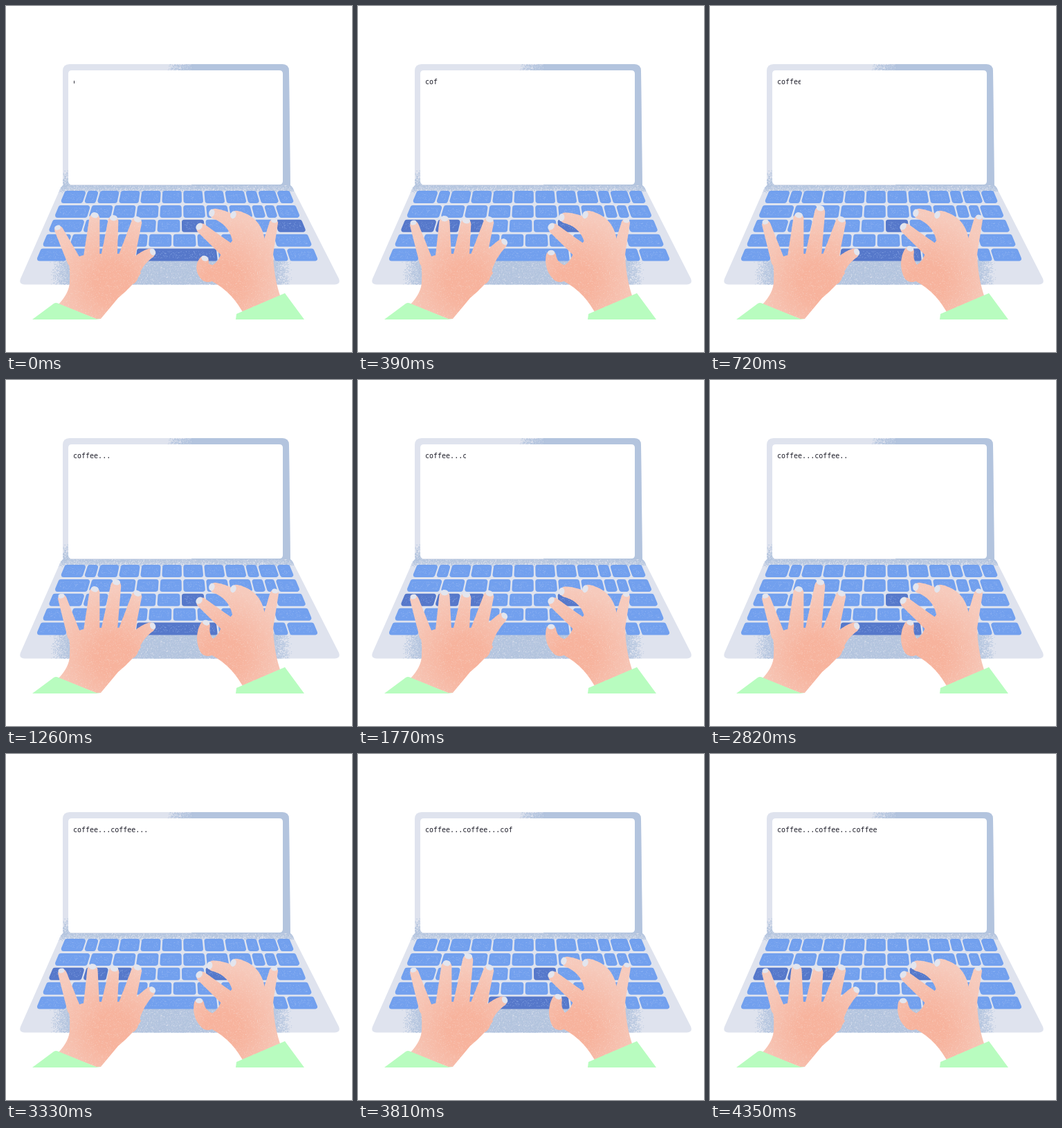
Animation of 500x500 px, one loop 4380 ms. Source, as an HTML page with a canvas:

```html
<!DOCTYPE html>
<html lang="en">
<head>
<meta charset="utf-8">
<style>
html, body { margin: 0; width: 100%; height: 100%; overflow: hidden; background: #fff; }
canvas { position: absolute; left: 0; top: 0; }
#text {
  position: absolute; left: 97px; top: 103px; overflow: hidden; white-space: pre;
  font: 10px/14px "DejaVu Sans Mono", "Noto Sans Mono", monospace; color: #1c1c28;
}
</style>
</head>
<body>
<canvas id="stage" width="500" height="500"></canvas>
<div id="text">coffee...coffee...coffee</div>
<script>
const LOOP = 4380, LIGHT = '#dfe3ee', SHADE = '#b3c4de';
const KEY = '#72a0ee', KEY_DOWN = '#5678ca', NAIL = '#e3e5ee', SLEEVE = '#b8fcbf';
const PALE = '#f6cabc', WARM = '#f7b39d';

let seed, g;
const rnd = () => (seed = (seed * 1664525 + 1013904223) >>> 0) / 4294967296;
const clamp = v => Math.max(0, Math.min(1, v));
const mix = (a, b, t) => a + (b - a) * t;

function fill(path, color) {
  g.fillStyle = color;
  g.fill(path);
}

function within(path, draw) {
  g.save();
  g.clip(path);
  draw();
  g.restore();
}

// Scatter specks over a box; density(x, y) is the chance of each one.
function grain(x, y, w, h, color, density) {
  g.fillStyle = color;
  for (let i = 0; i < w * h * 2.5; i++) {
    const px = x + rnd() * w, py = y + rnd() * h;
    if (rnd() < density(px, py)) g.fillRect(px, py, 0.9, 0.9);
  }
}

function drawLaptop() {
  const lid = new Path2D('M82 94Q82 84 92 84H399Q409 84 409 94L411 264H82Z');
  fill(lid, LIGHT);
  within(lid, () => {
    g.fillStyle = SHADE;
    g.fillRect(268, 84, 160, 180);
    grain(230, 84, 40, 10, SHADE, x => clamp((x - 232) / 36));
    grain(82, 236, 10, 28, SHADE, (x, y) => clamp((y - 236) / 28));
  });
  fill(new Path2D('M90 98Q90 93 95 93H395Q400 93 400 98V253Q400 258 395 258H95Q90 258 90 253Z'), '#fff');

  const base = new Path2D('M83 259H411Q414 261 416 266L481 394Q484 402 475 402.5H27Q18 402 21 394L77 267Q80 260 83 259Z');
  fill(base, LIGHT);
  within(base, () => {
    grain(76, 258, 342, 13, SHADE, (x, y) => clamp((270 - y) / 12));
    // Shadow of the hands, fading out on both sides
    grain(62, 366, 352, 37, SHADE, x => clamp((176 - Math.abs(x - 238)) / 30) ** 1.5);
  });
}

// Key widths of a row: special ones on the left, a run of equal ones, special ones on the right.
const row = (left, run, right) => [...left, ...Array(run).fill(1), ...right];
const ROWS = [
  row([1.1, 0.6], 7, [0.6, 0.9, 0.7]),
  row([1.45], 7, [0.55, 0.5, 0.95]),
  row([1.4], 8, [0.9, 1.2]).filter((w, i) => i !== 8),
  row([1.1, 0.9, 1, 1.3], 4, [1.2, 1.5]),
  row([1.2, 1, 1.65, 3.25], 1, [1.15, 0.6, 1.15])
];

function drawKeys(home, space) {
  const all = new Path2D();
  // The keyboard widens towards the viewer: u runs from -1 to 1 across it.
  const at = (u, y) => 247.5 + u * (163 + (y - 267) * 0.416);
  g.lineJoin = 'round';
  g.lineWidth = 7;
  ROWS.forEach((widths, r) => {
    const top = 270.5 + r * 20.9, bottom = top + 11;
    const total = widths.reduce((a, b) => a + b);
    let u = -1;
    widths.forEach((w, i) => {
      const next = u + 2 * w / total, key = new Path2D();
      key.moveTo(at(u, top) + 4.8, top);
      key.lineTo(at(next, top) - 4.8, top);
      key.lineTo(at(next, bottom) - 4.8, bottom);
      key.lineTo(at(u, bottom) + 4.8, bottom);
      key.closePath();
      const down = r === 2 && home.includes(i) || r === 4 && i === 3 && space;
      g.strokeStyle = down ? KEY_DOWN : KEY;
      fill(key, g.strokeStyle);
      g.stroke(key);
      all.addPath(key);
      u = next;
    });
  });
  within(all, () => grain(44, 267, 408, 102, 'rgba(170,197,246,.45)', () => 0.07));
}

// Tapered finger from base to tip, bowed sideways by bend.
function finger([x0, y0], [x1, y1], bend, r0, r1) {
  const dx = x1 - x0, dy = y1 - y0, len = Math.hypot(dx, dy);
  const cx = (x0 + x1) / 2 + dy / len * bend, cy = (y0 + y1) / 2 - dx / len * bend;
  const path = new Path2D();
  for (let t = 0; t <= 1; t += 0.02) {
    const x = mix(mix(x0, cx, t), mix(cx, x1, t), t);
    const y = mix(mix(y0, cy, t), mix(cy, y1, t), t);
    const r = mix(r0, r1, t);
    path.moveTo(x + r, y);
    path.arc(x, y, r, 0, 7);
  }
  const turn = Math.atan2(y1 - cy, x1 - cx), nail = new Path2D();
  nail.ellipse(x1 + Math.cos(turn) * r1 * 0.5, y1 + Math.sin(turn) * r1 * 0.5, r1 * 0.55, r1 * 0.75, turn, 0, 7);
  return { path, nail };
}

// Knuckles lie evenly from first to last, raised in the middle by lift.
const HANDS = {
  left: {
    palm: 'M90 366L120 358L176 358Q190 372 195 386Q184 404 162 422L137 452H130L76 431Q92 414 92 398Q93 380 90 366Z',
    first: [98, 368], last: [174, 364], lift: 0, pinky: 0,
    tips: [[76, 323], [128, 306], [155, 310], [189, 312]],
    thumb: [[178, 390], [209, 357]], glow: [155, 400]
  },
  right: {
    palm: 'M316 352L342 322L372 342L386 352Q386 392 398 424L345 448Q328 414 298 398L292 378Q306 372 310 360Z',
    first: [326, 358], last: [376, 360], lift: 20, pinky: 3,
    tips: [[282, 321], [301, 300], [332, 303], [387, 313]],
    thumb: [[292, 386], [286, 368]], glow: [315, 398]
  }
};

// Each pose shifts a few finger tips (4 is the thumb) away from rest.
const POSES = [
  { home: [5, 9], space: true, left: {}, right: {} },
  { home: [0, 1, 2, 6], space: false, left: { 0: [5, -7], 1: [-3, 5], 2: [1, 4], 4: [0, -14] }, right: { 1: [-3, 6], 4: [-7, -8] } },
  { home: [5], space: true, left: { 0: [5, -8], 2: [4, -14] }, right: { 3: [1, -5], 4: [2, -14] } }
];

function drawHand({ palm, first, last, lift, pinky, tips, thumb, glow }, shifts) {
  const moved = ([x, y], i) => {
    const [dx, dy] = shifts[i] || [0, 0];
    return [x + dx, y + dy];
  };
  const fingers = tips.map((tip, i) => {
    const arch = lift * Math.sin(Math.PI * i / 3);
    const knuckle = [mix(first[0], last[0], i / 3), mix(first[1], last[1], i / 3) - arch];
    const size = i === pinky ? 0.82 : 1;
    return finger(knuckle, moved(tip, i), -arch, (12 + arch / 6) * size, 7.5 * size);
  });
  fingers.push(finger(thumb[0], moved(thumb[1], 4), 8, 13, 7));

  const hand = new Path2D(palm);
  fingers.forEach(f => hand.addPath(f.path));
  const skin = g.createRadialGradient(...glow, 25, ...glow, 95);
  skin.addColorStop(0, WARM);
  skin.addColorStop(1, PALE);
  // Parts are filled one by one so that overlaps of opposite winding stay solid.
  [new Path2D(palm), ...fingers.map(f => f.path)].forEach(part => {
    fill(part, skin);
    within(part, () => grain(glow[0] - 90, 288, 180, 165, 'rgba(250,222,213,.4)', () => 0.06));
  });
  fingers.forEach(f => fill(f.nail, NAIL));
}

function render({ home, space, left, right }) {
  const c = document.createElement('canvas');
  c.width = c.height = 500;
  g = c.getContext('2d');
  seed = 7;
  drawLaptop();
  drawKeys(home, space);
  drawHand(HANDS.left, left);
  drawHand(HANDS.right, right);
  fill(new Path2D('M38 453L69 430Q72 428 76 430L130 452L137 453Z'), SLEEVE);
  fill(new Path2D('M332 453L333 445L403 415L431 453Z'), SLEEVE);
  return c;
}

const pictures = POSES.map(render);
const stage = document.getElementById('stage').getContext('2d');
const text = document.getElementById('text');

function frame(now) {
  const t = now % LOOP;
  stage.clearRect(0, 0, 500, 500);
  stage.drawImage(pictures[Math.floor((t + 55) % 780 / 260)], 0, 0);
  // One word with its dots is wiped in every 1720 ms, then the line waits.
  const typed = t + 55, word = Math.floor(typed / 1720);
  text.style.width = word * 54.2 + Math.min(54.2, typed % 1720 * 0.0435) + 'px';
  requestAnimationFrame(frame);
}
requestAnimationFrame(frame);
</script>
</body>
</html>
```
